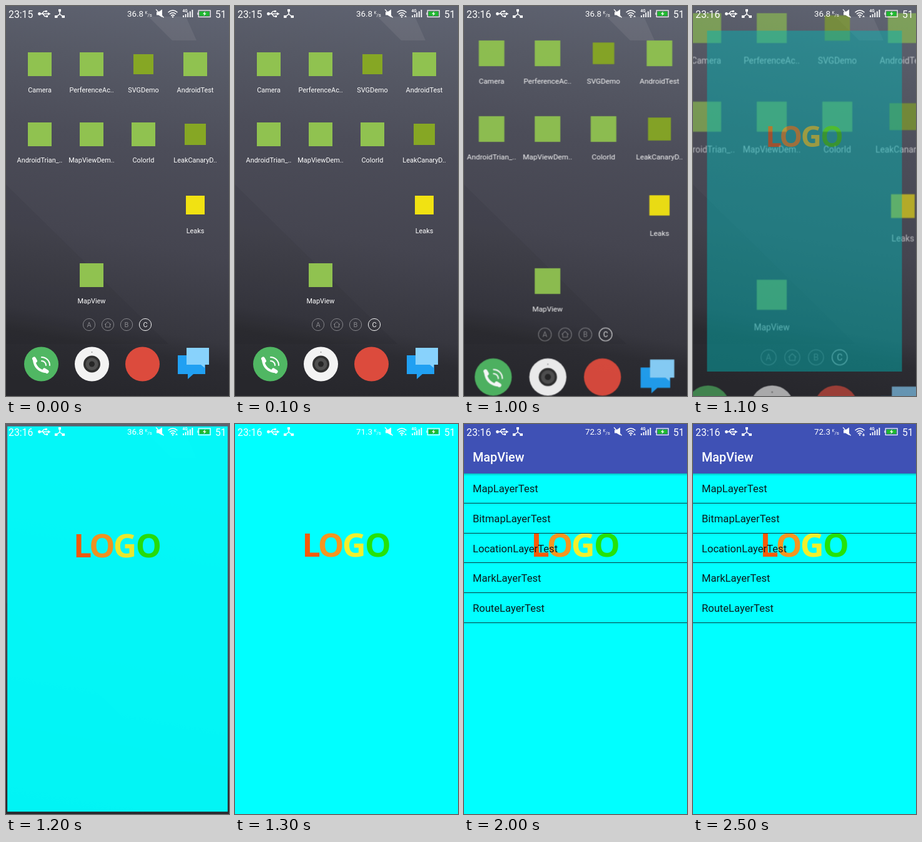
An HTML page that plays this animation: 357 by 623 pixels, repeating every 2700 ms.

```html
<!DOCTYPE html>
<html lang="en">
<head>
<meta charset="utf-8">
<title>MapView launch</title>
<style>
  html, body { margin: 0; width: 100%; height: 100%; overflow: hidden; background: #2b2b30; }
  svg { display: block; width: 357px; height: 623px; }
  text { font-family: Roboto, "Open Sans", sans-serif; }
  .label { font-size: 10.9px; fill: #fff; text-anchor: middle; }
  .page { font-size: 11px; fill: #fff; text-anchor: middle; }
  .row { font-size: 16.6px; fill: #0b1a1c; }
  .logo text { font: 700 52.5px "Open Sans", "Noto Sans", sans-serif; }
  .info { fill: #fff; }
</style>
</head>
<body>
<svg viewBox="0 0 357 623">
  <defs>
    <linearGradient id="wall" x1="0.6" y1="0" x2="0.5" y2="1">
      <stop offset="0" stop-color="#5e6270"/>
      <stop offset="0.15" stop-color="#565965"/>
      <stop offset="0.35" stop-color="#4c4d59"/>
      <stop offset="0.6" stop-color="#454550"/>
      <stop offset="0.82" stop-color="#37373f"/>
      <stop offset="0.88" stop-color="#2c2c32"/>
      <stop offset="1" stop-color="#27272c"/>
    </linearGradient>
    <linearGradient id="shade" x1="0" y1="0" x2="0" y2="1">
      <stop offset="0" stop-color="#000" stop-opacity="0.25"/>
      <stop offset="1" stop-color="#000" stop-opacity="0"/>
    </linearGradient>
    <radialGradient id="dot">
      <stop offset="0" stop-color="#ececec" stop-opacity="0.9"/>
      <stop offset="0.7" stop-color="#dedede" stop-opacity="0.85"/>
      <stop offset="1" stop-color="#c8c8c8" stop-opacity="0.3"/>
    </radialGradient>
  </defs>

  <g id="home">
    <rect width="357" height="623" fill="url(#wall)"/>
    <path d="M228 17H288L305 55H266Z" fill="#fff" opacity="0.07"/>
    <path d="M0 285L260 540H0Z" fill="#000" opacity="0.05"/>
    <g id="launcher">
      <g id="apps"></g>
      <g id="pages" fill="none" stroke="#fff"></g>
      <g>
        <circle cx="56.5" cy="572" r="27.5" fill="#50b763"/>
        <g fill="none" stroke="#fff" stroke-linecap="round">
          <path d="M45 566Q47 581 62 584" stroke-width="4"/>
          <path d="M45 563.5L47 567M61.5 581.5L65.5 584" stroke-width="6"/>
          <path d="M57 567a7 7 0 0 1 7 7M57 561a13 13 0 0 1 13 13" stroke-width="2"/>
        </g>
        <circle cx="137.5" cy="572" r="27.5" fill="#f3f3f3"/>
        <circle cx="137.5" cy="572" r="13.5" fill="#303030"/>
        <circle cx="137.5" cy="572" r="10" fill="#505050"/>
        <circle cx="137.5" cy="572" r="4.5" fill="#262626"/>
        <circle cx="137.5" cy="553" r="1" fill="#999"/>
        <circle cx="218.5" cy="572" r="27.5" fill="#dc4b3d"/>
        <path d="M275 558H319V588H300L291 596V588H275Z" fill="#21a0f2"/>
        <path d="M289 546H325V573H318V578L312 573H289Z" fill="#88d2fc"/>
      </g>
    </g>
    <circle id="touch" cx="146" cy="451" r="11" fill="url(#dot)"/>
  </g>

  <g id="splash">
    <rect id="cyan" width="357" height="623"/>
    <g class="logo">
      <text x="107.2" y="212" fill="#f85a08">L</text>
      <text x="132.8" y="212" fill="#f8951f">O</text>
      <text x="171.8" y="212" fill="#f3f02c">G</text>
      <text x="208" y="212" fill="#25e208">O</text>
    </g>
  </g>

  <g id="app">
    <rect y="79" width="357" height="4" fill="url(#shade)"/>
    <rect width="357" height="79" fill="#3f51b5"/>
    <text x="14" y="59.5" font-size="19.8" font-weight="500" fill="#fff">MapView</text>
    <g id="list"></g>
  </g>

  <g id="status" fill="none" stroke="#fff">
    <g stroke="none">
      <text id="clock" class="info" x="4" y="18.5" font-size="15.8"></text>
      <text id="speed" class="info" x="194" y="17" font-size="13.4"></text>
      <text class="info" x="222.5" y="13" font-size="6.5">K</text>
      <text class="info" x="226.5" y="17" font-size="8">/s</text>
      <text class="info" x="335" y="18.5" font-size="15.6">51</text>
      <text x="282.5" y="9.5" font-size="6.5" font-weight="700" fill="#fff">4G</text>
    </g>
    <path d="M53 12.5H68M57 12.5L61 8.5H64M59 12.5L62 16.5H65" stroke-width="1.3"/>
    <path d="M67 10L71.5 12.5L67 15ZM63 7h3v3h-3zM64 15h3v3h-3z" fill="#fff" stroke="none"/>
    <circle cx="53.5" cy="12.5" r="2.4" fill="#fff" stroke="none"/>
    <path d="M86 7V13L80.5 17M86 13L91.5 17" stroke-width="1.5"/>
    <path d="M84 5h4v4h-4zM78 15h4.5v4h-4.5zM89.5 15h4.5v4h-4.5z" fill="#fff" stroke="none"/>
    <path d="M241 9.5H244L250 5.5V18L244 14.5H241Z" fill="#fff" stroke="none"/>
    <path d="M240 5.5L252.5 18.5" stroke-width="1.3"/>
    <path d="M259.5 10.2Q267 3.8 274.5 10.2M262 13Q267 8.6 272 13M264.2 15.6Q267 13.2 269.8 15.6" stroke-width="1.5"/>
    <circle cx="267" cy="17.4" r="1.2" fill="#fff" stroke="none"/>
    <path id="up" d="M271 17.6L273 15L275 17.6Z" fill="#fff" stroke="none"/>
    <path id="down" d="M271 17.9L273 19.4L275 17.9Z" fill="#fff" stroke="none"/>
    <path d="M284 18V15M287.6 18V13M291.2 18V10.5M294.8 18V8.5M298.4 18V6" stroke-width="1.8"/>
    <rect x="308.2" y="7.1" width="19" height="10.4" stroke-width="1.2"/>
    <path d="M307 10.5v3.6" stroke-width="1.2"/>
    <rect x="309.8" y="8.7" width="15.8" height="7.2" fill="#20b830" stroke="none"/>
    <path d="M319 8.6L315 12.8H317.6L316.4 16L320.8 11.8H318Z" fill="#fff" stroke="none"/>
  </g>
</svg>
<script>
const LOOP = 2700, STEP = 100;
const NS = 'http://www.w3.org/2000/svg';
const $ = id => document.getElementById(id);

function add(parent, tag, attrs, text) {
  const el = document.createElementNS(NS, tag);
  for (const key in attrs) el.setAttribute(key, attrs[key]);
  if (text) el.textContent = text;
  return parent.appendChild(el);
}

// Column, row, label, icon colour, icon size
const GREEN = '#90c250', OLIVE = '#86a724';
const apps = [
  [0, 0, 'Camera', GREEN, 38], [1, 0, 'PerferenceAc..', GREEN, 38],
  [2, 0, 'SVGDemo', OLIVE, 32], [3, 0, 'AndroidTest', GREEN, 38],
  [0, 1, 'AndroidTrian_..', GREEN, 38], [1, 1, 'MapViewDem..', GREEN, 38],
  [2, 1, 'ColorId', GREEN, 38], [3, 1, 'LeakCanaryD..', OLIVE, 34],
  [3, 2, 'Leaks', '#f1e212', 30], [1, 3, 'MapView', GREEN, 38]
];
for (const [col, row, label, fill, size] of apps) {
  const x = 54 + col * 83, y = Math.round(93 + row * 112.3);
  add($('apps'), 'rect', { x: x - size / 2, y: y - size / 2, width: size, height: size, fill });
  add($('apps'), 'text', { x, y: y + 45, class: 'label' }, label);
}

['A', '', 'B', 'C'].forEach((letter, i) => {
  const x = 133 + i * 30;
  const g = add($('pages'), 'g', { opacity: i === 3 ? 0.95 : 0.4 });
  add(g, 'circle', { cx: x, cy: 509, r: 9.6, 'stroke-width': 1 });
  if (letter) add(g, 'text', { x, y: 513, class: 'page', stroke: 'none' }, letter);
  else add(g, 'path', { d: `M${x - 5} 509L${x} 504.5L${x + 5} 509M${x - 3.5} 508V513H${x + 3.5}V508` });
});

['Map', 'Bitmap', 'Location', 'Mark', 'Route'].forEach((name, i) => {
  const y = 109.3 + i * 47.7;
  add($('list'), 'text', { x: 14, y, class: 'row' }, name + 'LayerTest');
  add($('list'), 'rect', { x: 0, y: Math.round(126 + i * 47.7), width: 357, height: 1, fill: '#063c40' });
});

const clamp = v => Math.max(0, Math.min(1, v));
const show = (id, on) => $(id).setAttribute('display', on ? 'inline' : 'none');
const zoom = (id, s, cy) =>
  $(id).setAttribute('transform', `translate(178.5 ${cy}) scale(${s}) translate(-178.5 ${-cy})`);
const fade = (id, v) => $(id).setAttribute('opacity', v);

function draw(t) {
  show('home', t < 1300);
  show('touch', t >= 700 && t < 900);
  zoom('launcher', 1 + Math.max(0, t - 957) * 0.00185, 312);
  fade('launcher', 1 - clamp((t - 950) / 250) ** 2);

  // The splash brightens while it fades in and grows
  const glow = Math.round(255 * clamp((t - 1000) / 140));
  show('splash', t >= 1000);
  zoom('splash', 1 - 0.126 * (Math.max(0, 1284 - t) / 184) ** 3, 313);
  fade('splash', clamp((t - 1000) / 210));
  $('cyan').setAttribute('fill', `rgb(0,${glow},${glow})`);
  show('app', t >= 1600);

  $('clock').textContent = t < 1000 ? '23:15' : '23:16';
  $('speed').textContent = t < 1300 ? '36.8' : t < 1600 ? '71.3' : '72.3';
  show('up', t >= 100);
  show('down', t >= 2500);
}

const start = performance.now();
function tick() {
  const t = (performance.now() - start) % LOOP;
  draw(Math.floor(t / STEP) * STEP);
  requestAnimationFrame(tick);
}
tick();
</script>
</body>
</html>
```
